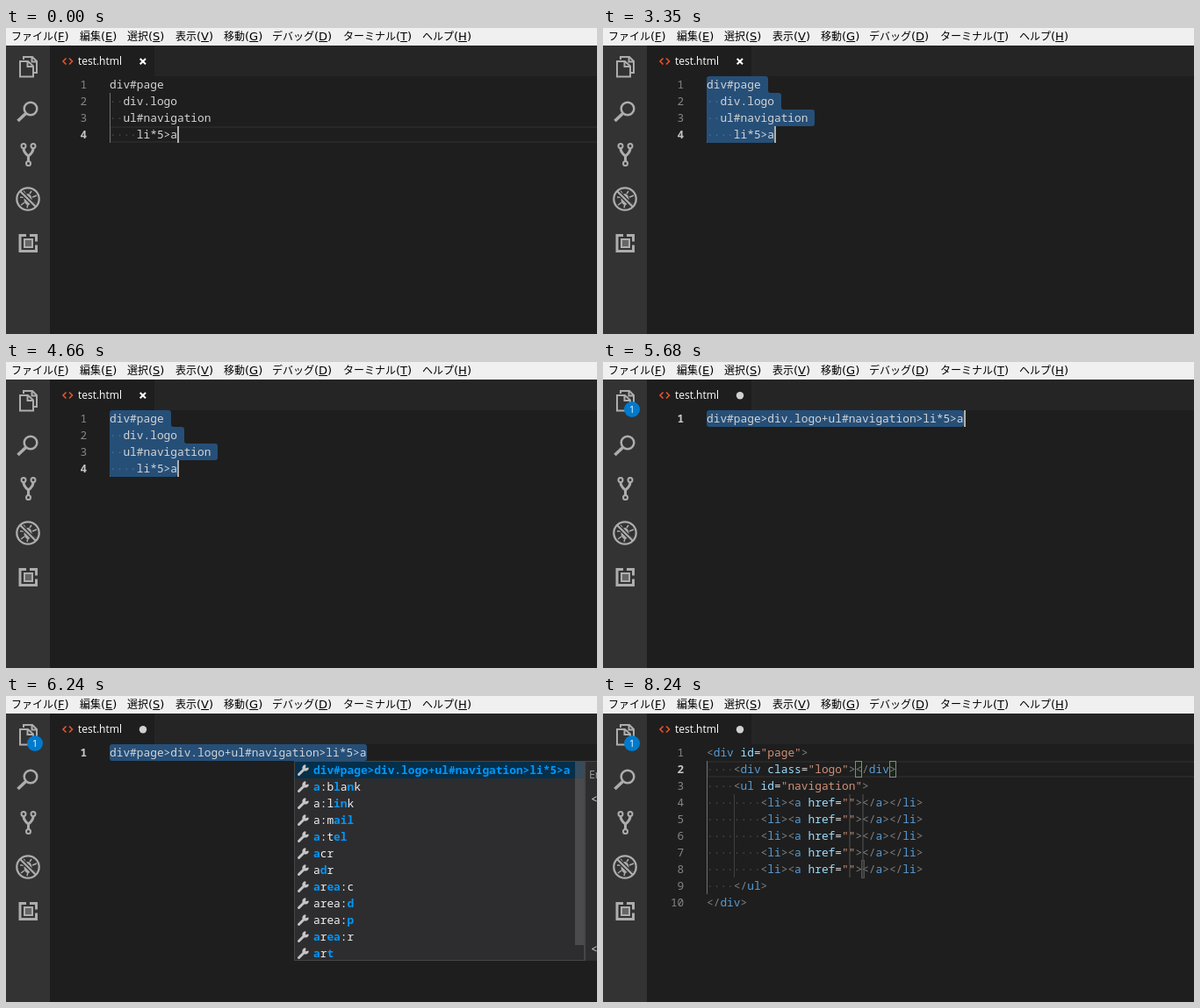
An HTML page that plays this animation: 673 by 349 pixels, repeating every 8.8 s.

```html
<!DOCTYPE html>
<html lang="ja">
<head>
<meta charset="utf-8">
<title>Editor</title>
<style>
html, body { margin: 0; width: 100%; height: 100%; overflow: hidden; background: #1e1e1e; }
#stage { position: absolute; left: 0; top: 0; width: 673px; height: 349px; overflow: hidden; background: #1e1e1e;
  font: 12.2px/22px 'Open Sans', 'Noto Sans CJK JP', sans-serif; color: #ccc; }
#stage div, #stage svg { position: absolute; }
#stage .full { left: 0; top: 0; width: 673px; height: 349px; }
.mono { font: 500 12.83px/19px 'Noto Sans Mono', monospace; white-space: pre; color: #d4d4d4; }

#menu { left: 0; top: 0; width: 673px; height: 20px; background: #f0f0f0; color: #000;
  font: 12px/19px 'DejaVu Sans', 'Noto Sans CJK JP', sans-serif; white-space: nowrap; }
#menu span { position: absolute; top: 0; }
#menu small { font-size: 13px; }
#side { left: 0; top: 20px; width: 50px; height: 329px; background: #333; }
#tabs { left: 50px; top: 20px; width: 623px; height: 35px; background: #252526; }
#tab { left: 0; top: 0; width: 119px; height: 35px; background: #1e1e1e; color: #fff; font-size: 12px; font-weight: 500; }
#tab span { position: absolute; left: 32px; top: 7px; }

.code { left: 118px; top: 55px; }
.nums { left: 52px; top: 55px; width: 40.3px; text-align: right; color: #858585; }
.nums b { color: #c6c6c6; }
.code s { text-decoration: none; color: #e3e4e238; }
.p { color: #808080; } .t { color: #569cd6; } .a { color: #9cdcfe; } .q { color: #ce9178; }
.line { left: 118px; width: 555px; height: 19px; box-sizing: border-box; border: 2px solid #282828; border-right: 0; }
.guide { width: 1px; background: #404040; }
.guide.on { background: #707070; }
.caret { width: 2px; height: 19px; background: #aeafad; }
.match { top: 74px; width: 8px; height: 19px; box-sizing: border-box; border: 1px solid #888; background: #0064001a; }
.stop { width: 2px; height: 19px; background: #7c7c7c4d; }
.stop.end { outline: 1px solid #525252; }

#palette { left: 204px; top: 20px; width: 600px; height: 307px; background: #252526; box-shadow: 0 5px 8px #000; white-space: nowrap; }
#input { left: 6px; top: 6px; width: 588px; height: 25px; box-sizing: border-box; border: 1px solid #0e5a8c; background: #3c3c3c; }
#input span { position: absolute; left: 5px; top: 0; }
#list { left: 0; top: 37px; width: 600px; }
#list p { margin: 0; padding-left: 11px; height: 22px; line-height: 24px; font-weight: 500; }
#list p.sub { opacity: .7; line-height: 20px; font-weight: 400; }
#list p:first-child { background: #062f4a; }
#list big { font-size: 13px; line-height: 1; }

#popup { left: 328px; top: 74px; width: 331px; height: 228px; box-sizing: border-box; overflow: hidden; border: 1px solid #454545; background: #2d2d30; color: #f0f0f0; }
#popup p { margin: 0; height: 19px; padding-left: 21px; position: relative; }
#popup p:first-child { background: #062f4a; }
#popup svg { left: 2px; top: 2px; }
#popup b { color: #0097fb; }
#popup .bar { right: 0; top: 0; width: 10px; height: 209px; background: #79797966; }
#docs { left: 659px; top: 74px; width: 200px; height: 228px; box-sizing: border-box; border: 1px solid #454545; border-bottom: 0; background: #2d2d30; }
#docs div { left: 6px; }

/* timeline */
.k { animation: 8.8s step-end infinite; }
#before { animation-name: before; }
@keyframes before { 0% { opacity: 1 } 53.863% { opacity: 0 } }
#after, #dot { animation-name: after; }
@keyframes after { 0% { opacity: 0 } 53.863% { opacity: 1 } }
#flat { animation-name: flat; }
@keyframes flat { 0%, 77.045% { opacity: 0 } 53.863% { opacity: 1 } }
#result { animation-name: result; }
@keyframes result { 0% { opacity: 0 } 77.045% { opacity: 1 } }
#line4 { animation-name: line4; }
@keyframes line4 { 0% { opacity: 1 } 14.886% { opacity: 0 } }
#pick { animation-name: pick; }
@keyframes pick {
  0% { opacity: 0; fill: #264f78 }
  14.886%, 52.954% { opacity: 1; fill: #264f78 }
  42.613% { opacity: 1; fill: #3a3d41 }
}
#caret1 { animation-name: caret1; }
@keyframes caret1 {
  0%, 7.954%, 14.886%, 26.477%, 38.068%, 52.954% { opacity: 1 }
  1.704%, 13.181%, 20.227%, 31.818%, 42.613% { opacity: 0 }
}
#palette { animation-name: palette; }
@keyframes palette { 0%, 52.954% { opacity: 0 } 42.613% { opacity: 1 } }
#caret2 { animation-name: caret2; }
@keyframes caret2 { 0% { opacity: 1 } 47.613% { opacity: 0 } }
#badge { animation-name: badge; }
@keyframes badge { 0% { opacity: 0 } 56.59% { opacity: 1 } }
#caret3 { animation-name: caret3; }
@keyframes caret3 { 0%, 64.545% { opacity: 1 } 59.204%, 70.909% { opacity: 0 } }
#popup { animation-name: popup; }
@keyframes popup { 0% { opacity: 0 } 68.977% { opacity: 1 } }
#docs { animation-name: docs; }
@keyframes docs { 0% { opacity: 0 } 69.886% { opacity: 1 } }
#caret4 { animation-name: caret4; }
@keyframes caret4 { 0%, 87.386% { opacity: 1 } 82.159%, 93.636% { opacity: 0 } }
</style>
</head>
<body>
<div id="stage">
  <div id="tabs">
    <div id="tab"><span>test.html</span></div>
  </div>

  <div id="before" class="k full">
    <div id="line4" class="k line" style="top:112px"></div>
    <div class="guide on" style="left:118px;top:74px;height:57px"></div>
    <svg class="full" viewBox="0 0 673 349"><path id="pick" class="k" d="M118 58q0-3 3-3H185q3 0 3 3v13q0 3 3 3h9q3 0 3 3v13q0 3 3 3h32q3 0 3 3v13q0 3-3 3H198q-3 0-3 3v13q0 3-3 3H121q-3 0-3-3z"/></svg>
    <div class="nums mono" data-count="4" data-on="4"></div>
    <div class="code mono" id="draft"></div>
    <div id="caret1" class="k caret" style="left:195px;top:112px"></div>
  </div>

  <div id="flat" class="k full">
    <div style="left:118px;top:55px;width:293px;height:19px;border-radius:3px;background:#264f78"></div>
    <div class="nums mono" data-count="1" data-on="1"></div>
    <div class="code mono" id="joined"></div>
    <div id="caret3" class="k caret" style="left:411px;top:55px"></div>
    <div id="docs" class="k">
      <div style="left:4px;top:4px;opacity:.7;white-space:nowrap">Emmet Abbreviation</div>
      <div class="mono" style="top:33px">&lt;</div>
      <div class="mono" style="top:204px">&lt;</div>
    </div>
    <div id="popup" class="k mono"></div>
  </div>

  <div id="result" class="k full">
    <div class="line" style="top:74px"></div>
    <div class="guide on" style="left:118px;top:74px;height:152px"></div>
    <div class="guide" style="left:149px;top:112px;height:95px"></div>
    <div class="match" style="left:287px"></div>
    <div class="match" style="left:326px"></div>
    <div class="nums mono" data-count="10" data-on="2"></div>
    <div class="code mono" id="markup"></div>
    <div id="stops"></div>
    <div id="caret4" class="k caret" style="left:287px;top:74px"></div>
  </div>

  <div id="palette" class="k">
    <div id="input"><span>&gt;</span><div id="caret2" class="k" style="left:13px;top:3px;width:1px;height:17px;background:#ccc"></div></div>
    <div id="list"></div>
  </div>

  <div id="side"></div>
  <svg class="full" viewBox="0 0 673 349" fill="none" stroke="#adadad" stroke-width="2">
    <!-- files -->
    <path d="M20 36V33H30L35 38V51H32M29.500 33V38.500H35M16 38H25L31 43.500V55.500H16ZM24.500 38V44H31"/>
    <!-- search -->
    <circle cx="28" cy="92" r="7.300" stroke-width="2.500"/>
    <path d="M22.500 97.500L13.500 106" stroke-width="3.600"/>
    <!-- branches -->
    <circle cx="20" cy="134.500" r="2.500"/><circle cx="31" cy="134.500" r="2.500"/><circle cx="25.500" cy="154.500" r="2.500"/>
    <path d="M20 137Q20 142 25.500 146Q31 142 31 137M25.500 145V152" stroke-width="3"/>
    <!-- debug -->
    <path d="M20 186L22 189M29 186L27 189M16 193H20M30 193L35 191M17 202L21 199M30 198L34 201M18 188L20 191M24 205L25 201" stroke-width="1.500"/>
    <ellipse cx="25" cy="195.500" rx="4.500" ry="6.500" fill="#adadad" stroke="none"/>
    <path d="M16 186L34 204" stroke="#333" stroke-width="5"/>
    <circle cx="25" cy="195" r="12.700" stroke-width="2.300"/>
    <path d="M16 186L34 204" stroke-width="2.300"/>
    <!-- extensions -->
    <path d="M23 236.500H16V254.500H34.500V247.500M27 236.500H34.500V243.500" stroke-width="3"/>
    <rect x="21" y="241" width="9" height="9" fill="#666"/>
    <!-- tab -->
    <path d="M68.500 34.500L65 38L68.500 41.500M72 34.500L75.500 38L72 41.500" stroke="#e4552d" stroke-width="1.600"/>
    <path d="M152.700 35L159 41.300M159 35L152.700 41.300" stroke="#fff"/>
    <g id="dot" class="k" stroke="none"><path d="M150 32H162V44H150Z" fill="#1e1e1e"/><circle cx="156" cy="38.200" r="4.200" fill="#d0d0d0"/></g>
  </svg>
  <div id="badge" class="k" style="left:24px;top:45px;width:18px;height:18px;border-radius:50%;background:#007acc;color:#fff;font-size:10.500px;line-height:18px;text-align:center">1</div>
  <div id="menu"></div>
</div>

<script>
const $ = id => document.getElementById(id);
const esc = s => s.replace(/</g, '&lt;').replace(/>/g, '&gt;');
const dots = s => s.replace(/^ +/, m => `<s>${'·'.repeat(m.length)}</s>`);
const draft = ['div#page', '  div.logo', '  ul#navigation', '    li*5>a'];
const joined = 'div#page>div.logo+ul#navigation>li*5>a';

$('draft').innerHTML = draft.map(l => dots(esc(l))).join('\n');
$('joined').textContent = joined;

const paint = line => line.replace(/^ +|<\/?|>|"[^"]*"|\w+(?==)|\w+/g, m => {
  if (m[0] === ' ') return dots(m);
  const kind = /[<>]/.test(m) ? 'p' : m[0] === '"' ? 'q' : /^(id|class|href)$/.test(m) ? 'a' : 't';
  return `<span class="${kind}">${esc(m)}</span>`;
});
$('markup').innerHTML = [
  '<div id="page">',
  '    <div class="logo"></div>',
  '    <ul id="navigation">',
  ...Array(5).fill('        <li><a href=""></a></li>'),
  '    </ul>',
  '</div>'
].map(paint).join('\n');

for (const el of document.querySelectorAll('.nums')) {
  const { count, on } = el.dataset;
  el.innerHTML = Array.from({ length: +count }, (_, i) => i + 1 == on ? `<b>${on}</b>` : i + 1).join('\n');
}

// empty tab stops of the five list items
for (let row = 0; row < 5; row++)
  for (const x of [280, 295])
    $('stops').innerHTML += `<div class="stop${row === 4 && x === 295 ? ' end' : ''}" style="left:${x}px;top:${112 + row * 19}px"></div>`;

$('menu').innerHTML = [
  [6, 'ファイル', 'F'], [84, '編集', 'E'], [138, '選択', 'S'], [193, '表示', 'V'],
  [248, '移動', 'G'], [303, 'デバッグ', 'D'], [384, 'ターミナル', 'T'], [474, 'ヘルプ', 'H']
].map(([x, name, key]) => `<span style="left:${x}px">${name}<small>(<u>${key}</u>)</small></span>`).join('');

const wide = s => s.replace(/[\u3000-\u9fff]+/g, '<big>$&</big>');
$('list').innerHTML = [
  ['Lemmet'],
  ['Emmet: 略語の展開', 'Emmet: Expand Abbreviation'],
  ['Emmet コマンドの表示', 'Show Emmet Commands'],
  ['Sync : Update / Upload Settings'],
  ['Sync : Reset Extension Settings'],
  ['Sync : Download Settings'],
  ['拡張機能: 拡張機能のインストール', 'Extensions: Install Extensions'],
  ['タスク: ビルド タスクの実行', 'Tasks: Run Build Task']
].map(([name, sub]) => `<p>${wide(name)}</p>` + (sub ? `<p class="sub">${sub}</p>` : '')).join('');

// brackets mark the matched letters
const wrench = `<svg width="15" height="15" fill="none" stroke="#c5c5c5">
  <path d="M2.500 12.500L8.500 6.500" stroke-width="3" stroke-linecap="round"/>
  <path d="M10.500 2.300A3 3 0 1 0 12.700 4.800L10 5.200Z" fill="#c5c5c5" stroke="none"/>
  <path d="M10.200 2.200A2.700 2.700 0 1 0 12.800 4.800" stroke-width="2"/></svg>`;
$('popup').innerHTML = [
  `[${joined}]`, '[a]:b[l]a[n]k', 'a:l[in]k', 'a:m[ail]', '[a]:t[el]', '[a]cr', 'a[d]r',
  '[a]r[ea]:c', 'area:[d]', 'area:[p]', '[a]r[ea]:r', '[a]r[t]'
].map(s => `<p>${wrench}${esc(s).replace(/\[/g, '<b>').replace(/\]/g, '</b>')}</p>`).join('') + '<div class="bar"></div>';
</script>
</body>
</html>
```
